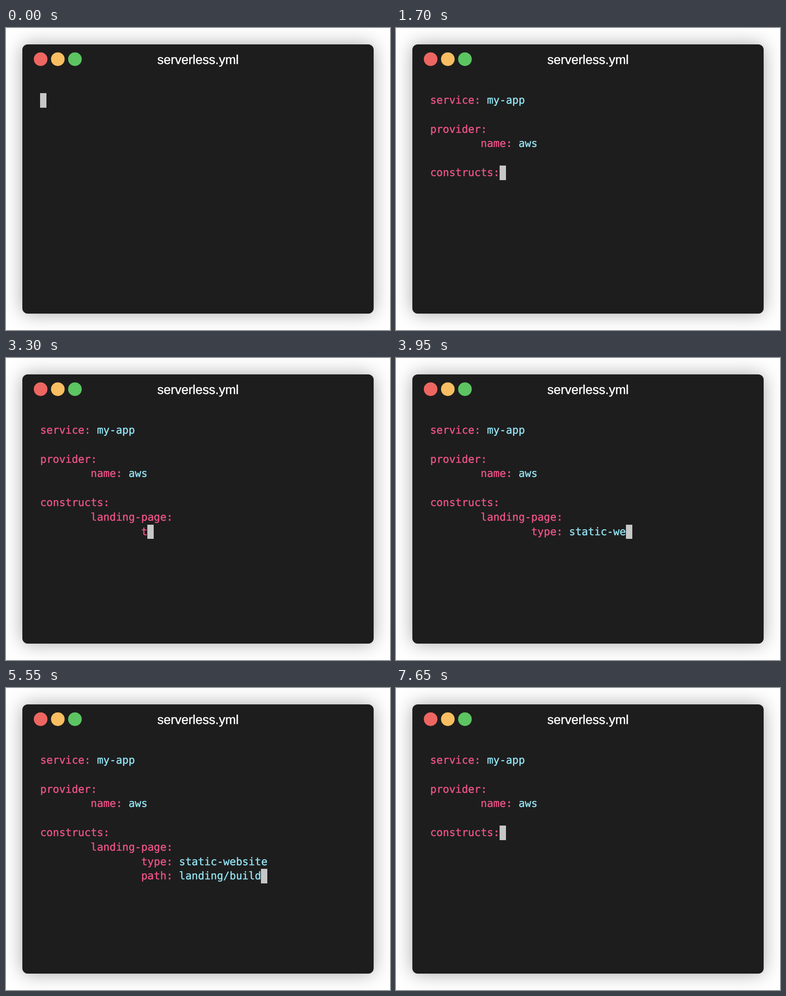
Recreate the animation shown at these times as an HTML page. Size 845 px wide and 663 px high, loop 8000 ms.

```html
<!DOCTYPE html>
<html lang="en">
<head>
<meta charset="utf-8">
<title>serverless.yml</title>
<style>
  html, body { margin: 0; width: 100%; height: 100%; overflow: hidden; background: #fff; }
  .window {
    position: absolute; left: 36px; top: 36px; width: 773px; height: 591px;
    border-radius: 12px; background: #1d1d1d;
    box-shadow: 0 0 1px rgba(0, 0, 0, .3), 0 0 40px rgba(0, 0, 0, .34);
    text-rendering: geometricPrecision;
  }
  .dots { position: absolute; left: 0; top: 0; }
  .title {
    position: absolute; left: 0; right: 0; top: 17px; text-align: center;
    font: 28px/34px "Liberation Sans", Arial, sans-serif; color: #fff;
    -webkit-text-stroke: .5px #fff;
  }
  #screen {
    position: absolute; left: 39.2px; top: 107px;
    font: 23.1px/31.8px "DejaVu Sans Mono", monospace;
  }
  #screen span { position: absolute; white-space: pre; }
  .key, .value { margin-top: 1px; -webkit-text-stroke: .45px; }
  .key { color: #ef5489; }
  .value { color: #93e5f6; }
  .cursor { width: 13.9px; height: 31.8px; background: #c7c7c7; }
</style>
</head>
<body>
<div class="window">
  <svg class="dots" width="140" height="60">
    <circle cx="40.2" cy="32.4" r="15" fill="#ee6661"/>
    <circle cx="78" cy="32.4" r="15" fill="#f8be61"/>
    <circle cx="115.7" cy="32.4" r="15" fill="#5cc562"/>
  </svg>
  <div class="title">serverless.yml</div>
  <div id="screen"></div>
</div>
<script>
const LOOP = 8000, STEP = 50, CLEAR = 7550, REPRINT = 7650;
const CELL_W = 13.89, CELL_H = 31.8;
const TAB = ' '.repeat(8);
const INTRO = `service: my-app\n\nprovider:\n${TAB}name: aws\n\n`;
const TYPED = [
  [1200, 'constructs:'],
  [2200, `\n${TAB}landing-page:`],
  [3300, `\n${TAB}${TAB}type: static-website`],
  [4700, `\n${TAB}${TAB}path: landing/build`]
];

const screen = document.getElementById('screen');
const start = performance.now();
let shown = null;

// Whitespace is printed together with the character after it.
function typeOut(text, elapsed) {
  const count = Math.max(0, Math.floor(elapsed / STEP) + 1);
  return text.match(/\s*\S/g).slice(0, count).join('');
}

function textAt(t) {
  if (t < TYPED[0][0]) return '';
  if (t >= REPRINT) return INTRO + TYPED[0][1];
  if (t >= CLEAR) return '';
  return INTRO + TYPED.map(([at, text]) => typeOut(text, t - at)).join('');
}

function addCell(type, col, row, text = '') {
  const cell = document.createElement('span');
  cell.className = type;
  cell.style.left = col * CELL_W + 'px';
  cell.style.top = row * CELL_H + 'px';
  cell.textContent = text;
  screen.append(cell);
}

function render(text) {
  screen.replaceChildren();
  const lines = text.split('\n');
  lines.forEach((line, row) => {
    for (const word of line.matchAll(/\S+/g)) {
      const isValue = line.slice(0, word.index).includes(':');
      addCell(isValue ? 'value' : 'key', word.index, row, word[0]);
    }
  });
  addCell('cursor', lines.at(-1).length, lines.length - 1);
}

function tick() {
  const text = textAt((performance.now() - start) % LOOP);
  if (text !== shown) render(shown = text);
  requestAnimationFrame(tick);
}
tick();
</script>
</body>
</html>
```
